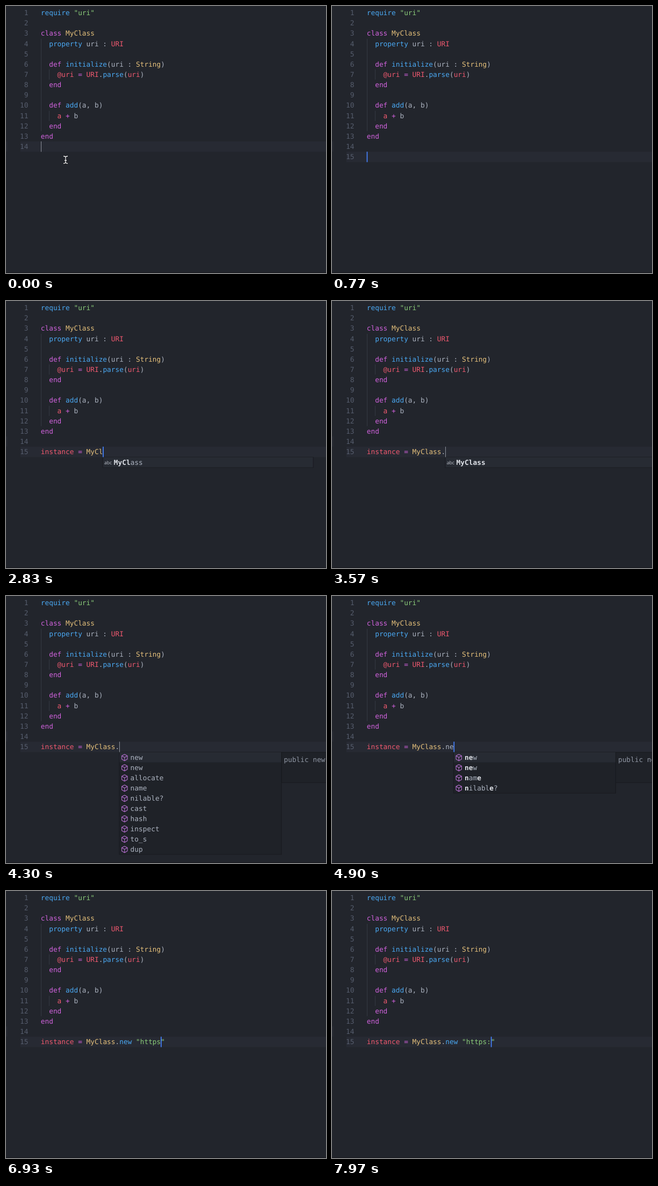
An HTML page for the animation above (8000 ms loop, 596 px wide and 497 px high).

```html
<!DOCTYPE html>
<html lang="en">
<head>
<meta charset="utf-8">
<title>Editor completion</title>
<style>
  html, body { margin: 0; width: 100%; height: 100%; overflow: hidden; background: #22252c; }
  svg { display: block; }
  text { font: 12.8px "DejaVu Sans Mono", monospace; white-space: pre; text-rendering: geometricPrecision; }
  .abc { font: 8.6px "Open Sans", sans-serif; }
</style>
</head>
<body>
<svg id="stage" width="596" height="497" viewBox="0 0 596 497"></svg>
<script>
const LOOP = 8000, CHAR = 7.706, ROW = 19.15, LEFT = 64.8;
const INK = { w: '#abb2bf', b: '#4aa8f2', p: '#d062dc', r: '#ef596f', y: '#e5c07b', g: '#89ca78', h: '#dfe2e8' };

const CODE = [
  '{b}require {g}"uri"',
  '',
  '{p}class {y}MyClass',
  '{b}  property {w}uri : {r}URI',
  '',
  '{p}  def {b}initialize{w}(uri : {y}String{w})',
  '{r}    @uri {p}= {r}URI{w}.{b}parse{w}({r}uri{w})',
  '{p}  end',
  '',
  '{p}  def {b}add{w}(a, b)',
  '{r}    a {p}+ {w}b',
  '{p}  end',
  '{p}end',
  ''
];
const TYPED = '{r}instance {p}= {y}MyClass{w}.{b}new {g}"https:';

// [time, typed characters]
const KEYS = [
  [450, 0], [900, 1], [980, 2], [1060, 3], [1140, 4], [1220, 5], [1300, 6], [1390, 7], [1480, 8],
  [1570, 9], [1650, 10], [1830, 11], [2420, 12], [2560, 13], [2670, 14], [2790, 15], [2950, 16],
  [3150, 17], [3380, 18], [3500, 19], [4500, 20], [4750, 21], [5130, 22], [5400, 23],
  [5760, 24], [6220, 25], [6350, 26], [6470, 27], [6600, 28], [6760, 29], [7050, 30]
];
const LISTS = {
  19: ['new', 'new', 'allocate', 'name', 'nilable?', 'cast', 'hash', 'inspect', 'to_s', 'dup'],
  20: ['new', 'new', 'name', 'nilable?', 'inspect', 'instance'],
  21: ['new', 'new', 'name', 'nilable?'],
  22: ['new', 'new']
};

const esc = s => s.replace(/&/g, '&amp;').replace(/</g, '&lt;');
const span = (s, color, extra = '') => `<tspan fill="${color}" ${extra}>${esc(s)}</tspan>`;
const rect = (x, y, w, h, fill, extra = '') =>
  `<rect x="${x}" y="${y}" width="${w}" height="${h}" fill="${fill}" ${extra}/>`;
const text = (x, y, body, extra = '') => `<text x="${x}" y="${y}" ${extra}>${body}</text>`;
const base = n => 17.1 + (n - 1) * ROW;

// Colours a marked-up line, keeping only the first `max` characters.
function paint(line, max = Infinity) {
  const parts = line.split(/\{(\w)\}/);
  let out = '';
  for (let i = 1; i < parts.length && max > 0; i += 2) {
    const s = parts[i + 1].slice(0, max);
    max -= s.length;
    out += span(s, INK[parts[i]]);
  }
  return out;
}

const lineNumber = n => text(41.4, base(n), n, 'text-anchor="end" fill="#565d6d"');

const guide = (x, y, h) => rect(x, y, 1, h, '#343942');

const page = CODE.map((line, i) => lineNumber(i + 1) + text(LEFT, base(i + 1), paint(line))).join('')
  + guide(65, 61, 172) + guide(80, 118, 19) + guide(80, 195, 19)
  + rect(0, 495.6, 596, 1.4, '#1a1c21');

const beam = ['#15171b" stroke-width="3', '#f2f2f2" stroke-width="1.3'].map(stroke =>
  `<path d="M107 279.5Q111 279.5 111 282Q111 279.5 115 279.5M111 281V291.5M107 293Q111 293 111 290.5Q111 293 115 293M109 287.5H113" fill="none" stroke="${stroke}"/>`
).join('');

const cube = (x, y) =>
  `<path d="M${x} ${y - 6}l5.2 2.9v6.2l-5.2 2.9l-5.2-2.9v-6.2zM${x - 5.2} ${y - 3.1}l5.2 2.9l5.2-2.9M${x} ${y - .2}v6.2" fill="none" stroke="#b56fd0" stroke-width="1.1" stroke-linejoin="round"/>`;

// Emphasises the characters of `word` that match `query` in order.
function matched(word, query) {
  let q = 0;
  return [...word].map(c => {
    const hit = c === query[q];
    if (hit) q++;
    return span(c, hit ? INK.h : INK.w, hit ? 'font-weight="700"' : '');
  }).join('');
}

function popup(x, width, words, query, icon) {
  const top = 291, h = words.length * 19;
  let out = rect(x, top, width, h, '#1f2228', 'stroke="#181a1f"') + rect(x + .5, top, width - 1, 18.6, '#272b33');
  words.forEach((word, i) => {
    const y = top + 9.7 + i * 19;
    out += icon(x, y) + text(x + 20.6, y + 4.4, matched(word, query));
  });
  return out;
}

const abcIcon = (x, y) => text(x + 2.8, y + 2.8, 'abc', 'class="abc" fill="#c3c8d1"');
const cubeIcon = (x, y) => cube(x + 9.8, y);

function completion(n, t, x) {
  if (n < 12 || n > 22) return '';
  if (n < 19 || t < 4250)
    return popup(x, 392, ['MyClass'], 'MyClass'.slice(0, n - 11), abcIcon);
  const docX = x + 302;
  return rect(docX, 291, 320, 56.5, '#1f2228', 'stroke="#181a1f"')
    + text(docX + 4.5, 309, span('public new(uri : String)', '#8f96a3'))
    + popup(x, 302, LISTS[n], 'new'.slice(0, n - 19), cubeIcon);
}

function render(t) {
  const key = KEYS.filter(k => k[0] <= t).pop();
  const n = key ? key[1] : 0;
  const row = key ? 15 : 14;
  const top = row === 15 ? 271.2 : 252;
  const x = 64.6 + n * CHAR;
  const grey = !key || n === 19;

  let out = rect(27, top, 569, 19.4, '#272a33') + rect(0, 252, 2.5, 19, '#272a33');
  if (n === 24) out += rect(234.5, 271.7, 22.2, 18.8, '#661420', 'rx="2" stroke="#861b28"');
  out += page;
  if (key) {
    const line = n < 22 ? TYPED.replace('{b}', '{w}') : TYPED;
    out += lineNumber(15) + text(LEFT, base(15), paint(line, n) + (n > 23 ? span('"', INK.g) : ''));
  } else {
    out += beam;
  }
  out += completion(n, t, x);
  out += grey ? rect(Math.round(x), top, 1, 19.4, '#8d929c') : rect(x, top, 1.7, 19.4, '#4683ff');
  return out;
}

const stage = document.getElementById('stage');
const start = performance.now();
let shown = '';
function tick() {
  const next = render((performance.now() - start) % LOOP);
  if (next !== shown) stage.innerHTML = shown = next;
  requestAnimationFrame(tick);
}
tick();
</script>
</body>
</html>
```
